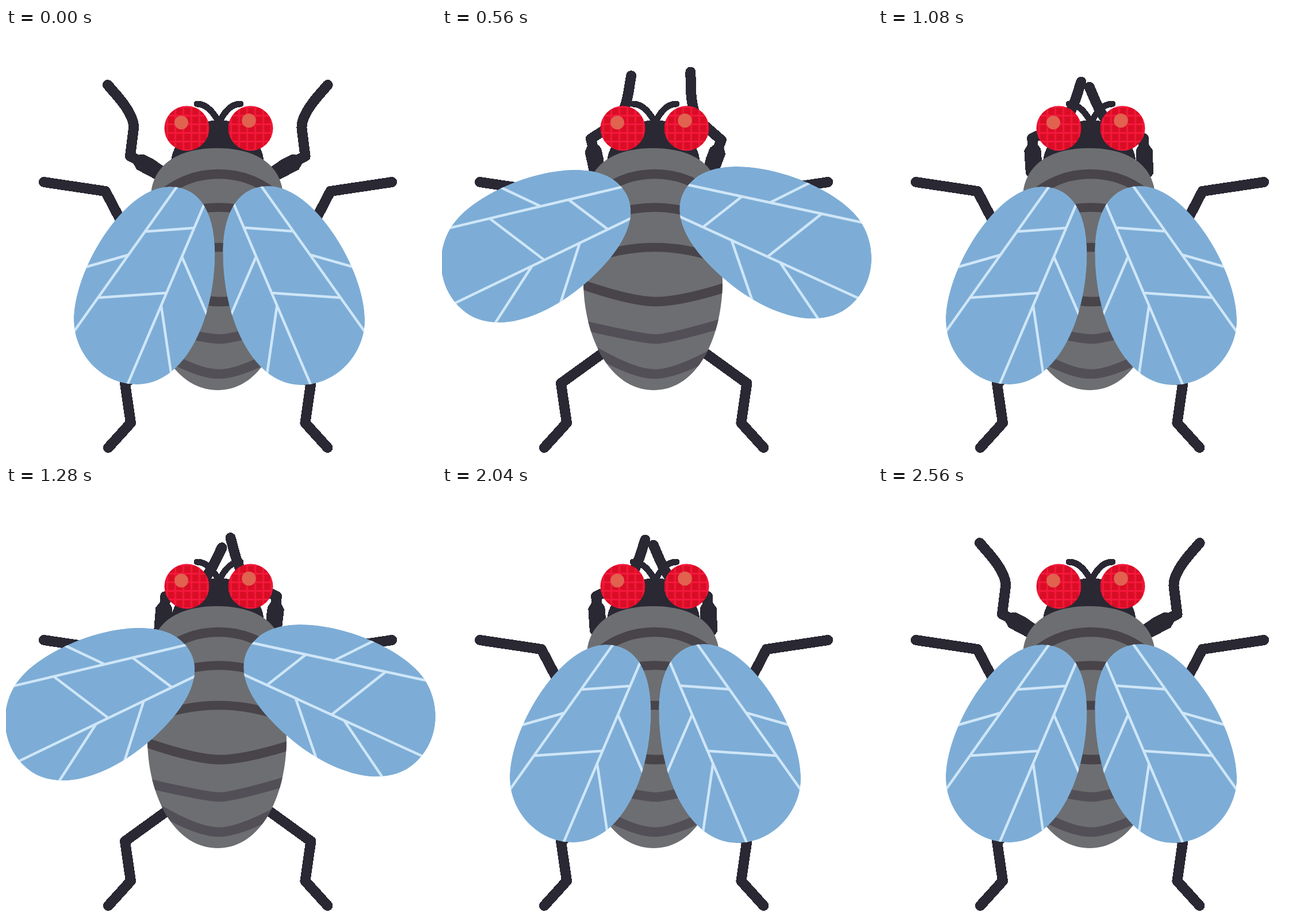
Animation, 748 px wide and 748 px high, one loop 2.88 s. Source, as an HTML page:

```html
<!DOCTYPE html>
<html lang="en">
<head>
<meta charset="utf-8">
<title>Fly</title>
<style>
  html, body { margin: 0; width: 100%; height: 100%; overflow: hidden; background: #fff; }
  svg { display: block; width: 100%; height: 100%; }
  .line { fill: none; stroke-linecap: round; stroke-linejoin: round; }
  .leg { stroke: #2a2833; stroke-width: 18; }
  .vein { stroke: #cfe6f8; stroke-width: 4.5; }
  .hard { shape-rendering: crispEdges; }
</style>
</head>
<body>
<svg viewBox="0 0 748 748">
  <defs>
    <path id="torso" d="M252 290C255 244 291 209 367 209S479 244 482 290L488 440C488 535 446 630 368 630S246 535 246 440Z"/>
    <path id="wingShape" d="M285 276C340 276 363.5 326 363.5 392C363.5 505 312 620 228 620C165 620 118 565 118 508C118 420 206 275.5 285 276Z"/>
    <clipPath id="torsoClip"><use href="#torso"/></clipPath>
    <clipPath id="wingClip"><use href="#wingShape"/></clipPath>
    <pattern id="facets" x="-27" y="-29.5" width="14" height="15" patternUnits="userSpaceOnUse">
      <path d="M0 0H14V15H0Z" fill="#d90d25"/>
      <path d="M7 0V15M0 7.5H14" stroke="#f4183c" stroke-width="3"/>
    </pattern>
    <circle id="eye" r="39" fill="url(#facets)"/>
    <g id="backLegs" class="line leg">
      <path d="M66 268L173 284L210 355"/>
      <path d="M290 558L207 618L217 687L178 730"/>
    </g>
    <g id="frontLeg">
      <path class="line leg" d="M177 99L196 121Q224 155 222 175L216 223L232 231"/>
      <path fill="#2a2833" d="M219 231L233 220H240L256 228L275 241L282 262L263 265L227 246Z"/>
    </g>
    <g id="wing" clip-path="url(#wingClip)">
      <use href="#wingShape" fill="#7dadd6"/>
      <path class="line vein" d="M298 275L116 531M346 304L211 621M243 354L325 348M212 395L138 416M162 469L277 461M306 398L352 504M270 483L288 606"/>
    </g>
  </defs>

  <g class="hard">
    <use href="#backLegs"/>
    <use href="#backLegs" transform="matrix(-1 0 0 1 737.4 0)"/>
    <use id="legL" href="#frontLeg"/>
    <g transform="matrix(-1 0 0 1 736.6 0)"><use id="legR" href="#frontLeg"/></g>
    <path fill="#2a2833" d="M287 232C290 195 330 160 371 160S445 195 449 232Z"/>
    <path class="line" stroke="#2a2833" stroke-width="11" d="M332 132Q352 132 368 160M408 132Q388 132 373 160"/>
  </g>

  <use href="#torso" fill="#6d6e71"/>
  <g class="line" stroke="#48444a" stroke-width="16.5" clip-path="url(#torsoClip)">
    <path d="M276 286Q318 254 370 254T464 286"/>
    <path d="M300 323Q370 301 440 323M250 405Q370 358 490 405" stroke-width="15.5"/>
    <path d="M240 445Q330 476 372 476T494 451"/>
    <path stroke="#534f57" d="M250 518Q350 541 372 541T490 513M270 565Q335 602 370 602T472 566"/>
  </g>

  <use href="#eye" transform="translate(314.5 174.5)"/>
  <use href="#eye" transform="translate(425.5 174.5)"/>
  <g fill="#e0624f"><circle cx="305" cy="164.5" r="12"/><circle cx="422.5" cy="161" r="12.3"/></g>

  <use id="wingL" href="#wing"/>
  <g transform="matrix(-1.006 0 0 1.006 743 -2.7)"><use id="wingR" href="#wing"/></g>
</svg>
<script>
const STEP = 40, LOOP = 2880;
const turn = (id, angle, x, y) =>
  document.getElementById(id).setAttribute('transform', `rotate(${angle} ${x} ${y})`);

function draw() {
  const n = Math.floor(performance.now() % LOOP / STEP);

  // Wings flutter: half open, open, snap shut; they rest at the end of the loop.
  const open = n < 63 ? n % 3 / 2 : 0;
  turn('wingL', 41.2 * open, 304.7, 297.6);
  turn('wingR', 42.4 * open, 308.3, 296);

  // Front legs swing together, rub back and forth, then swing out again.
  const reach = Math.max(0, Math.min(1, (n - 8) / 8, (64 - n) / 8));
  const rub = n > 16 && n < 56 ? 5.5 * (Math.abs(n % 8 - 4) / 2 - 1) : 5.5;
  turn('legL', (61.2 + rub) * reach, 270, 254);
  turn('legR', (61.2 - rub) * reach, 270, 254.5);

  requestAnimationFrame(draw);
}
draw();
</script>
</body>
</html>
```
